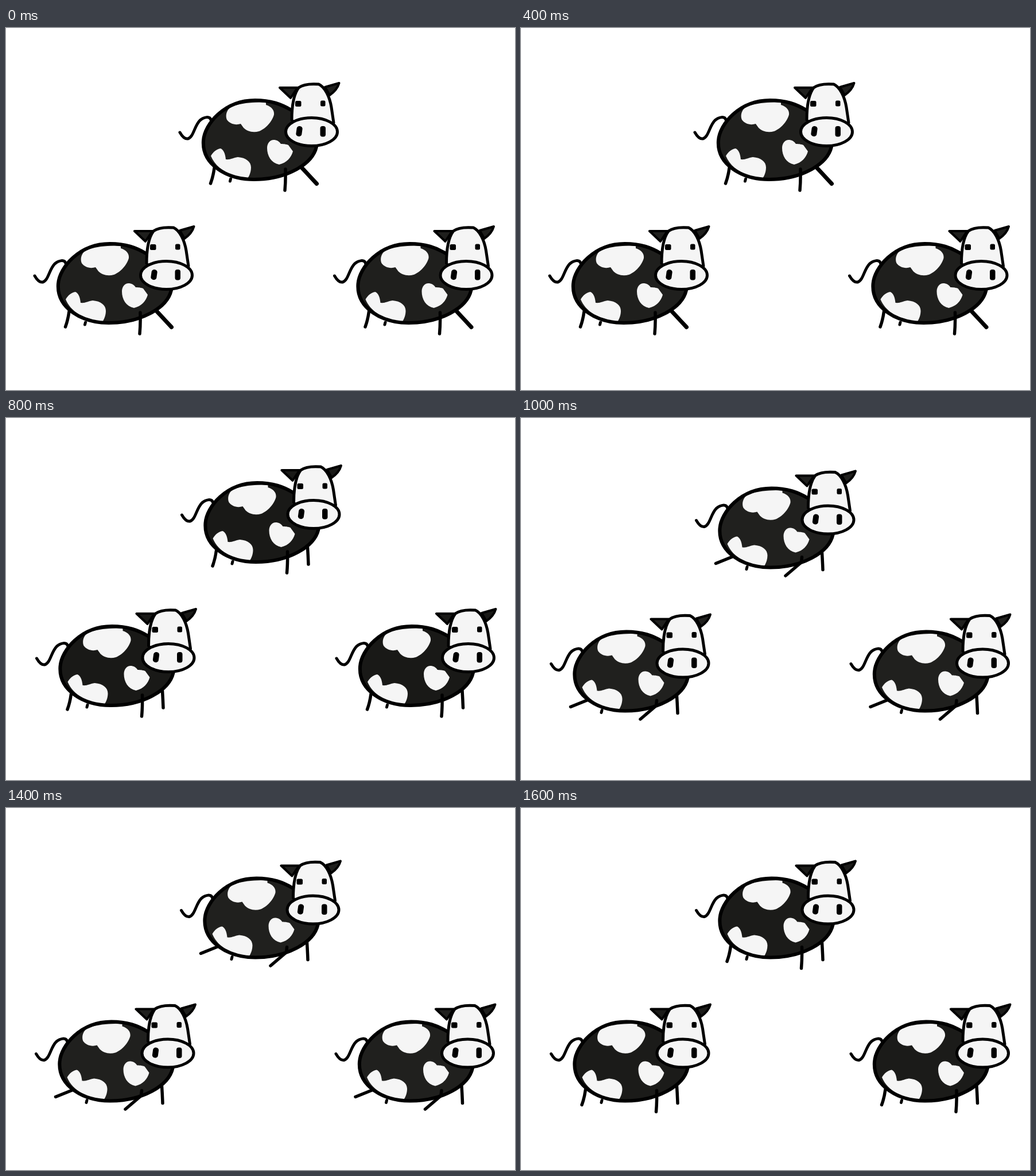
An HTML page for the animation above (1800 ms loop, 887 by 631 pixels).

```html
<!DOCTYPE html>
<html lang="en">
<head>
<meta charset="utf-8">
<title>Three cows</title>
<style>
html, body { margin: 0; width: 100%; height: 100%; overflow: hidden; background: #fff; }
svg { display: block; }
</style>
</head>
<body>
<svg width="887" height="631" viewBox="0 0 887 631">
  <defs>
    <g id="cow" fill="none" stroke="#000" stroke-width="5" stroke-linecap="round" stroke-linejoin="round">
      <path d="M303 182C307 189 311 194 317 193C327 190 328 171 338 161C345 155 355 153 357 160"/>
      <path id="body" stroke="none" d="M344 196C346 168 380 126 434 126C462 126 480 133 497 143L541 207C534 238 488 264 432 264C385 264 341 238 344 196Z"/>
      <g fill="#f5f5f5" stroke="none">
        <path d="M395 136Q424 128 453 130L453 134C463 137 468 144 467 151C464 163 452 176 441 180C430 183 420 180 414 174L409 167C400 170 390 167 385 160C381 150 387 139 395 136Z"/>
        <path d="M455 209C455 200 461 194 468 195C474 196 477 199 479 202C485 202 490 203 492 204L500 215C497 226 489 235 476 238C462 235 455 223 455 209Z"/>
        <path d="M357 223C361 216 367 211 374 210C379 212 382 219 383 229C391 230 396 226 404 225C418 226 427 233 427 243C427 251 424 258 421 262C393 259 367 247 357 223Z"/>
      </g>
      <path stroke-width="6" d="M497 143C480 133 462 126 434 126C380 126 346 168 344 196C341 238 385 264 432 264C488 264 534 238 541 207"/>
      <path id="back"/>
      <path d="M391.500 263L390.500 267"/>
      <path id="near"/>
      <path id="far"/>
      <g id="ears" stroke-width="4">
        <path d="M477 104L508 104L496 122Z"/>
        <path d="M580.500 96L556 103L564 117C573 111 578 105 580.500 96Z"/>
      </g>
      <path fill="#f5f5f5" d="M498 160C498 138 501 116 510 104C518 98 532 97 545 98C556 103 564 120 567 138L571 165"/>
      <ellipse cx="532.500" cy="181" rx="45" ry="24.500" fill="#f5f5f5"/>
      <g fill="#000" stroke="none">
        <rect x="504" y="127" width="10.500" height="10" rx="2.500"/>
        <rect x="548" y="126.500" width="8.500" height="10" rx="2.500"/>
        <rect x="506" y="171" width="10" height="18" rx="4.500" transform="rotate(8 511 180)"/>
        <rect x="547.500" y="171" width="9.500" height="18.500" rx="4"/>
      </g>
    </g>
  </defs>
  <g id="herd">
    <use href="#cow"/>
    <use href="#cow" x="-253" y="250"/>
    <use href="#cow" x="269.500" y="250"/>
  </g>
</svg>
<script>
const STEP = 200;
const el = id => document.getElementById(id);

const legs = {
  back: { down: 'M363 244Q361 259 356.500 271', out: 'M365.500 245.500L337 257' },
  near: { down: 'M487 246Q487.500 266 486 283', out: 'M487 246L486 255L458.500 278.500' },
  far: { down: 'M522 238Q523 254 523.500 268', out: 'M515 243L541.500 271.500' }
};

const pose = (x, y, fill, out = '') => ({ x, y, fill, out });
const kick = pose(0, 0, '#1f1f1d', 'far');
const rest = pose(0, 0, '#222022');
const hop = pose(3.5, -13, '#191917');
const stride = pose(2.5, -3.5, '#20201e', 'back near');
const stand = pose(2.5, -3.5, '#1b1b19');
const steps = [kick, rest, kick, rest, hop, stride, stand, stride, stand];

function draw(ms) {
  const p = steps[Math.floor(ms / STEP) % steps.length];
  el('herd').setAttribute('transform', `translate(${p.x} ${p.y})`);
  el('body').setAttribute('fill', p.fill);
  el('ears').setAttribute('fill', p.fill);
  for (const name in legs) {
    const out = p.out.includes(name);
    el(name).setAttribute('d', legs[name][out ? 'out' : 'down']);
    el(name).setAttribute('stroke-width', out && name === 'far' ? 7 : 5.5);
  }
}

let start;
function tick(now) {
  start ??= now;
  draw(Math.max(0, now - start));
  requestAnimationFrame(tick);
}
draw(0);
requestAnimationFrame(tick);
</script>
</body>
</html>
```
